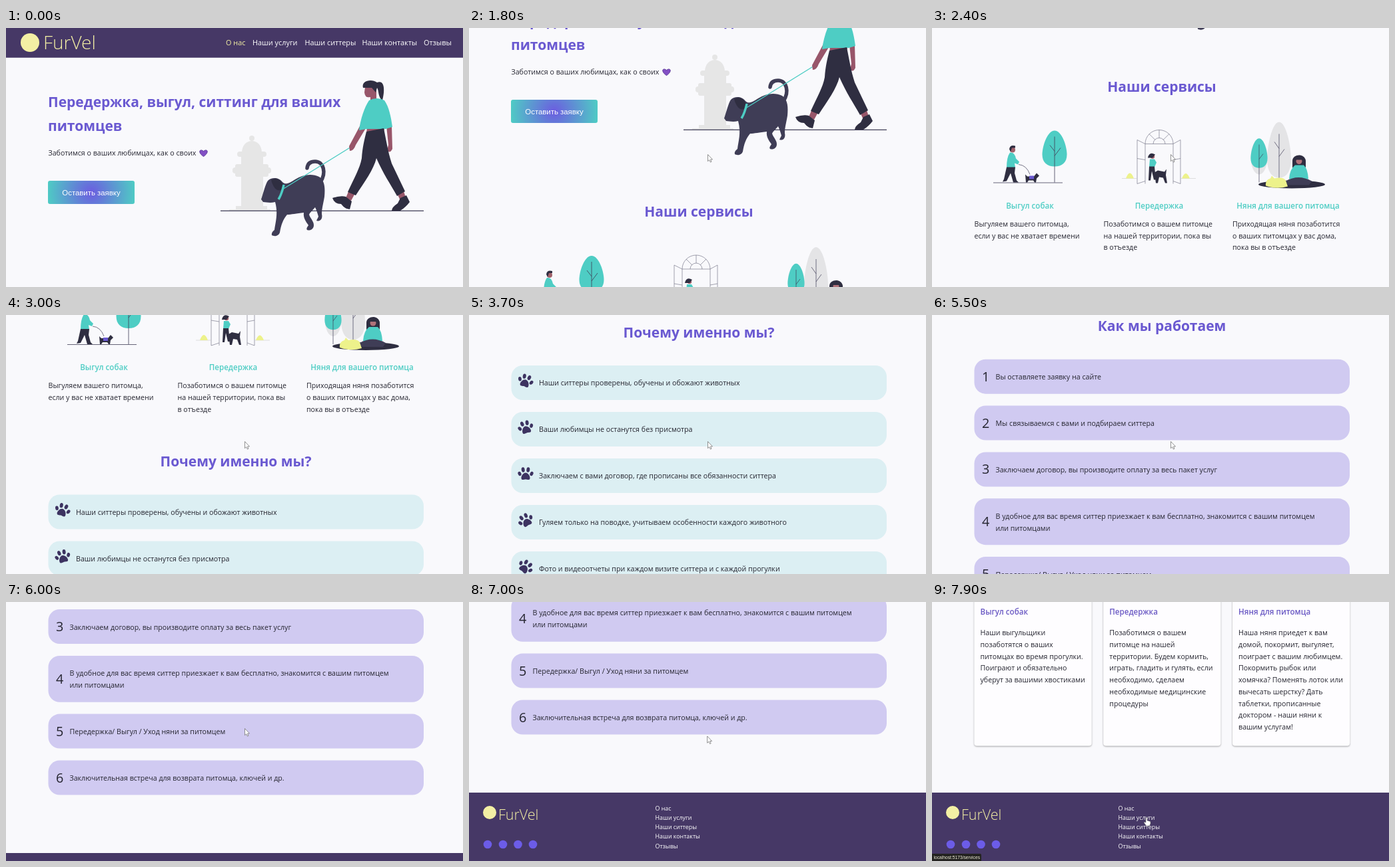
These frames come from a looping animation (686 px wide and 390 px high, 8000 ms). An HTML page:

```html
<!DOCTYPE html>
<html lang="ru">
<head>
<meta charset="utf-8">
<title>FurVel</title>
<style>
html, body { margin: 0; width: 100%; height: 100%; overflow: hidden; background: #f9f9fc; }
svg { display: block; width: 686px; height: 390px; }
text { font: 10.65px "Open Sans", sans-serif; fill: #252530; }
.title { font-size: 21px; font-weight: 650; fill: #6a59d1; }
.sub { font-size: 11.6px; font-weight: 600; fill: #4ecdc4; }
.violet { fill: #6a59c4; }
.mid { text-anchor: middle; }
.nav { font-size: 10.9px; font-weight: 500; fill: #fff; }
.link { font-size: 8.9px; font-weight: 500; fill: #fff; }
.active, .brand { fill: #f3efa4; }
.brand { font-weight: 300; font-size: 28px; }
.button { font: 11.4px "Liberation Sans", Arial, sans-serif; fill: #fff; }
.digit { font-size: 19.8px; }
.url { font: 6.7px "Liberation Sans", Arial, sans-serif; fill: #f2f0dc; }
</style>
</head>
<body>
<svg viewBox="0 0 686 390">
  <defs>
    <radialGradient id="glow" gradientUnits="userSpaceOnUse" cx="128" cy="247.5" r="67">
      <stop offset="0" stop-color="#6c5ce0"/><stop offset="1" stop-color="#4ecdc4"/>
    </radialGradient>
    <filter id="shadow" x="-5%" y="-5%" width="110%" height="110%">
      <feDropShadow dx="0" dy="1" stdDeviation="1.2" flood-color="#444" flood-opacity=".55"/>
    </filter>
    <g id="paw" fill="#3d3361">
      <path d="M0-1.500C4-1.500 7 4 6.500 7C6 10.500 2 8.500 0 8.500S-6 10.500-6.500 7C-7 4-4-1.500 0-1.500Z"/>
      <ellipse cx="-9" cy="0" rx="2.400" ry="3.300" transform="rotate(-25 -9 0)"/>
      <ellipse cx="-3.800" cy="-6" rx="2.500" ry="3.700" transform="rotate(-8 -3.800 -6)"/>
      <ellipse cx="3.800" cy="-6" rx="2.500" ry="3.700" transform="rotate(8 3.800 -6)"/>
      <ellipse cx="9" cy="0" rx="2.400" ry="3.300" transform="rotate(25 9 0)"/>
    </g>
    <path id="crown" d="M0-27C11-27 18.500-3 18.500 9C18.500 21 11 27 0 27S-18.500 21-18.500 9C-18.500-3-11-27 0-27Z"/>
    <g id="hero">
      <g fill="#e6e6e6">
        <circle cx="369" cy="166" r="4"/>
        <path d="M354 188C354 164 384 164 384 188Z"/>
        <rect x="347" y="186" width="44" height="8" rx="4"/>
        <path d="M353 193H386V268H392V275H345V268H353Z"/>
        <rect x="344" y="205" width="50" height="19" rx="3"/>
        <rect x="340" y="210" width="58" height="9" rx="4"/>
        <rect x="335" y="273" width="62" height="2"/>
      </g>
      <path d="M322 275.300H627" stroke="#3f3d56" stroke-width="1.200"/>
      <path d="M472 232C481 218 477 201 464 201Q453 201 452 211" fill="none" stroke="#3f3d56" stroke-width="5.500" stroke-linecap="round"/>
      <path fill="#3f3d56" d="M383 258C386 250 389 236 393 230C398 225 409 224 415 232C420 237 426 233 434 228C446 220 460 219 470 224C479 230 479 242 478 254C476 266 474 272 474 280C476 289 470 292 466 290L469 284C468 280 466 274 464 270C459 276 456 278 455 281C457 287 462 291 462 297C462 303 456 306 452 304C450 302 453 299 454 297C450 291 446 286 447 278C436 279 428 281 422 281C416 288 413 296 411 308C409 314 402 314 399 312C398 308 401 306 403 304C404 294 409 280 404 262C396 264 390 262 386 262Z"/>
      <path fill="#2f2e41" d="M398 229Q408 223 415 234Q420 240 413 244Q403 247 398 229Z"/>
      <path d="M417 236Q414 250 409 258" fill="none" stroke="#4ecdc4" stroke-width="3.500"/>
      <path d="M415 243L518 179" stroke="#4ecdc4" stroke-width="1.300"/>
      <g fill="#98566a">
        <path d="M539 89H556V111H547V104Q539 106 538 97Z"/>
        <path d="M532 146L540 151L525 176Q522 185 516 185L515 178Z"/>
        <path d="M571 147H579L580 182Q576 190 572 184L574 176Z"/>
        <path d="M542 148H569L566 160H541ZM515 244L524 249L518 260L510 256ZM587 249L597 246L601 258L592 260Z"/>
      </g>
      <path fill="#2f2e41" d="M536 90C533 79 549 76 557 82C570 77 568 98 565 109C558 104 560 94 557 90L555 97L549 90Z"/>
      <path fill="#4ecdc4" d="M545 109Q557 103 568 109C575 119 578 134 580 149L570 152L541 152L530 154C532 138 538 119 545 109Z"/>
      <path fill="#2f2e41" d="M541 156L567 151C571 170 573 185 579 204L599 246L587 253C577 235 566 219 556 196C552 213 538 232 525 252L513 247C523 225 531 212 534 196C535 180 538 168 541 156ZM490 256Q502 252 510 254L519 261L516 273Q509 273 503 265Q493 265 490 256ZM579 275Q579 270 588 264L592 256L601 252L606 262Q600 270 592 275Z"/>
    </g>
    <g id="walker">
      <path d="M92 543.500H196" stroke="#3f3d56" stroke-width=".8"/>
      <use href="#crown" x="184" y="492" fill="#4ecdc4"/>
      <path d="M184 474V543M184 503L193 491M184 496L177 487" fill="none" stroke="#3f3d56" stroke-width=".8"/>
      <circle cx="121" cy="494" r="4" fill="#a0616a"/>
      <path d="M116 493Q117 486 125 488V491H120L118 497Z" fill="#2f2e41"/>
      <path d="M117 498Q124 497 126 507L131 512L129 516L124 514L125 521H112Q112 505 117 498Z" fill="#4ecdc4"/>
      <path d="M112 520H125L124 529L127 540L130 543H122L118 529L112 541L106 542L108 538Z" fill="#2f2e41"/>
      <path d="M130 516Q142 517 147 531" fill="none" stroke="#3f3d56" stroke-width=".7"/>
      <path d="M140 531L143 534H153L157 529L161 533L157 537L156 543H154L152 540H145L143 543H141Z" fill="#2f2e41"/>
      <path d="M146 533H153V538H146Z" fill="#6a59d1"/>
    </g>
    <g id="doorway" fill="none" stroke="#66657a" stroke-width=".6">
      <path d="M320 545V485A21 21 0 0 1 362 485V545M332 485A9 9 0 0 1 350 485M320 485H362M341 464V476M326 470L335 479M356 470L347 479M320 485L308 479V545L320 541M362 485L373 479V545L362 541M308 507L320 509M373 507L362 509"/>
      <path d="M285 537H308M373 537H396" stroke="#ccc"/>
      <g stroke="none">
        <path d="M291 537Q297 521 303 537ZM375 537Q381 522 387 537Z" fill="#edf28b"/>
        <circle cx="331" cy="504" r="3.200" fill="#a0616a"/>
        <path d="M324 506Q326 496 335 501L331 506Z" fill="#2f2e41"/>
        <path d="M327 508H334L337 513L334 520H326Z" fill="#4ecdc4"/>
        <path d="M326 519H334L336 539H333L330 526L328 540H325ZM334 528L339 525L349 527L352 523L351 532L353 544H350L347 536L341 535L339 544H336Z" fill="#2f2e41"/>
      </g>
    </g>
    <g id="nanny">
      <use href="#crown" transform="translate(521 494) scale(.97 1.56)" fill="#e4e4e6"/>
      <ellipse cx="491" cy="505" rx="12.500" ry="26" fill="#e4e4e6"/>
      <use href="#crown" transform="translate(491 499) scale(.68 .82)" fill="#4ecdc4"/>
      <path d="M491 486V543M491 508L497 500M521 470V543M521 504L529 493M521 492L514 482" fill="none" stroke="#3f3d56" stroke-width=".7"/>
      <ellipse cx="540" cy="546" rx="50" ry="6" fill="#2f2e41"/>
      <path d="M541 521V510C542 500 559 499 561 510V521Z" fill="#2f2e41"/>
      <circle cx="551" cy="511" r="4.500" fill="#b0727a"/>
      <path d="M546 509Q551 502 557 509Z" fill="#2f2e41"/>
      <path d="M545 517H558Q564 522 565 538H536Q537 523 545 517Z" fill="#4ecdc4"/>
      <path d="M531 541Q550 530 570 541L566 547H534Z" fill="#3f3d56"/>
      <path d="M501 548Q500 539 508 537L510 533L514 537Q527 534 531 540L534 549Q518 554 501 548Z" fill="#edf28b"/>
    </g>
    <path id="arrow" d="M0 0V10.200L2.300 8.200L3.900 11.600L5.500 10.800L4 7.500H7Z" fill="#fff" stroke="#777" stroke-width=".8"/>
    <path id="hand" d="M-1 0Q0-1.500 1 0V4L6 5.500V9L4.500 12H-.5L-4 7Q-3.500 5.500-1 7Z" fill="#fff" stroke="#555" stroke-width=".5"/>
  </defs>
  <rect width="686" height="390" fill="#f9f9fc"/>
  <g id="home"></g>
  <g id="services"></g>
  <g id="status">
    <path d="M0 379H72Q74 379 74 381V390H0Z" fill="#242321"/>
    <text class="url" x="2.500" y="387">localhost:5173/services</text>
  </g>
  <use id="pointer" href="#arrow"/>
</svg>
<script>
const LOOP = 8000, FRAME = 100;
const $ = id => document.getElementById(id);
const purple = '#463866', yellow = '#f3efa4';

// y is the visual middle of a line
const text = (x, y, s, cls = '') => `<text class="${cls}" x="${x}" y="${y + 4}">${s}</text>`;
const title = (y, s) => `<text class="title mid" x="345" y="${y + 8}">${s}</text>`;
const lines = (x, y, list, step = 17.8) => list.map((s, i) => text(x, y + i * step, s)).join('');
const box = (y, h, fill) => `<rect x="63.500" y="${y}" width="563.500" height="${h}" rx="17" fill="${fill}"/>`;
const use = id => `<use href="#${id}"/>`;

const menu = ['О нас', 'Наши услуги', 'Наши ситтеры', 'Наши контакты', 'Отзывы'];
const menuX = [330, 370, 448.5, 534.5, 627];

const header = () => `<rect width="686" height="44.700" fill="${purple}"/>
  <circle cx="36" cy="22" r="14" fill="${yellow}"/>
  <text class="brand" x="56" y="32">FurVel</text>` +
  menu.map((s, i) => text(menuX[i], 22, s, i ? 'nav' : 'nav active')).join('');

const footer = y => `<g transform="translate(0 ${y})">
  <rect width="686" height="104" fill="${purple}"/>
  <circle cx="31" cy="30" r="10" fill="${yellow}"/>
  <text class="brand" style="font-size:21.5px" x="44" y="40.500">FurVel</text>` +
  [28, 51, 73.5, 96].map(x => `<circle cx="${x}" cy="78" r="6.300" fill="#6c5ce7"/>`).join('') +
  menu.map((s, i) => text(279.5, 22.8 + i * 14.2, s, 'link')).join('') + '</g>';

const hero = `<text class="title" x="63" y="119">Передержка, выгул, ситтинг для ваших</text>
  <text class="title" x="63" y="155">питомцев</text>` +
  text(63.5, 188, 'Заботимся о ваших любимцах, как о своих') +
  `<path d="M296.500 193.500C287 187 291 181 296.500 185.500C302 181 306 187 296.500 193.500Z" fill="#8350c4" stroke="#61409c"/>
  <rect x="63" y="230" width="130" height="35" rx="3" fill="url(#glow)"/>
  <text class="button mid" x="128" y="251.500">Оставить заявку</text>` + use('hero');

const offers = [
  [63.5, 147, 'Выгул собак', ['Выгуляем вашего питомца,', 'если у вас не хватает времени']],
  [257.5, 341, 'Передержка', ['Позаботимся о вашем питомце', 'на нашей территории, пока вы', 'в отъезде']],
  [451, 534.5, 'Няня для вашего питомца', ['Приходящая няня позаботится', 'о ваших питомцах у вас дома,', 'пока вы в отъезде']],
].map(([x, mid, name, body]) => text(mid, 578, name, 'sub mid') + lines(x, 605.3, body)).join('');

const reasons = [
  [18, 'Наши ситтеры проверены, обучены и обожают животных'],
  [-15, 'Ваши любимцы не останутся без присмотра'],
  [0, 'Заключаем с вами договор, где прописаны все обязанности ситтера'],
  [-30, 'Гуляем только на поводке, учитываем особенности каждого животного'],
  [38, 'Фото и видеоотчеты при каждом визите ситтера и с каждой прогулки'],
  [-12, 'Мы предоставляем возможность круглосуточного видеонаблюдения за вашими питомцами'],
].map(([turn, s], i) => {
  const y = 769.5 + i * 70;
  return box(y, 52, '#dceff3') + text(105, y + 26.3, s) +
    `<use href="#paw" transform="translate(85 ${y + 23}) rotate(${turn})"/>`;
}).join('');

let stepY = 1325.7;
const steps = [
  ['Вы оставляете заявку на сайте'],
  ['Мы связываемся с вами и подбираем ситтера'],
  ['Заключаем договор, вы производите оплату за весь пакет услуг'],
  ['В удобное для вас время ситтер приезжает к вам бесплатно, знакомится с вашим питомцем', 'или питомцами'],
  ['Передержка/ Выгул / Уход няни за питомцем'],
  ['Заключительная встреча для возврата питомца, ключей и др.'],
].map((body, i) => {
  const h = 34.2 + body.length * 17.8, y = stepY;
  stepY += h + 17.9;
  return box(y, h, '#d0caf1') + lines(95.5, y + 26.5, body) +
    `<text class="digit" x="75" y="${y + h / 2 + 7}">${i + 1}</text>`;
}).join('');

$('home').innerHTML = header() + hero + title(398, 'Наши сервисы') +
  use('walker') + use('doorway') + use('nanny') + offers +
  title(719, 'Почему именно мы?') + reasons +
  title(1275, 'Как мы работаем') + steps + footer(1832.5);

$('services').innerHTML = [
  ['Выгул собак', ['Наши выгульщики', 'позаботятся о ваших', 'питомцах во время прогулки.', 'Поиграют и обязательно', 'уберут за вашими хвостиками']],
  ['Передержка', ['Позаботимся о вашем', 'питомце на нашей', 'территории. Будем кормить,', 'играть, гладить и гулять, если', 'необходимо, сделаем', 'необходимые медицинские', 'процедуры']],
  ['Няня для питомца', ['Наша няня приедет к вам', 'домой, покормит, выгуляет,', 'поиграет с вашим любимцем.', 'Покормить рыбок или', 'хомячка? Поменять лоток или', 'вычесать шерстку? Дать', 'таблетки, прописанные', 'доктором - наши няни к', 'вашим услугам!']],
].map(([name, body], i) => {
  const x = 63.5 + i * 193.8;
  return `<rect x="${x}" y="-20" width="176" height="236.500" rx="4" fill="#fefdff" filter="url(#shadow)"/>` +
    text(x + 9, 15, name, 'sub violet') + lines(x + 9, 46, body, 17.75);
}).join('') + footer(287);

// [time, value...]
const scrollPath = [[1300, 0], [1400, 10], [1800, 122], [3000, 499], [3700, 693.5], [3900, 715],
  [4200, 715], [4400, 775], [4900, 1024.5], [6000, 1454.5], [6200, 1505], [6500, 1545.5]];
const pointerPath = [[6900, 358.5, 190.5], [7200, 356, 225], [7500, 338, 290], [7800, 322, 325]];

function sample(path, t) {
  const i = path.findIndex(p => p[0] > t);
  if (i === 0) return path[0].slice(1);
  if (i < 0) return path[path.length - 1].slice(1);
  const a = path[i - 1], b = path[i], k = (t - a[0]) / (b[0] - a[0]);
  return a.slice(1).map((v, j) => v + (b[j + 1] - v) * k);
}
const show = (id, on) => $(id).setAttribute('visibility', on ? 'visible' : 'hidden');

function draw(now) {
  const t = Math.floor(now % LOOP / FRAME) * FRAME;
  $('home').setAttribute('transform', `translate(0 ${-sample(scrollPath, t)[0]})`);
  $('pointer').setAttribute('transform', `translate(${sample(pointerPath, t)})`);
  $('pointer').setAttribute('href', t >= 7700 ? '#hand' : '#arrow');
  show('home', t < 7900);
  show('services', t >= 7900);
  show('status', t >= 7700);
  show('pointer', t >= 700);
}
const start = performance.now();
function tick() {
  draw(performance.now() - start);
  requestAnimationFrame(tick);
}
tick();
</script>
</body>
</html>
```
